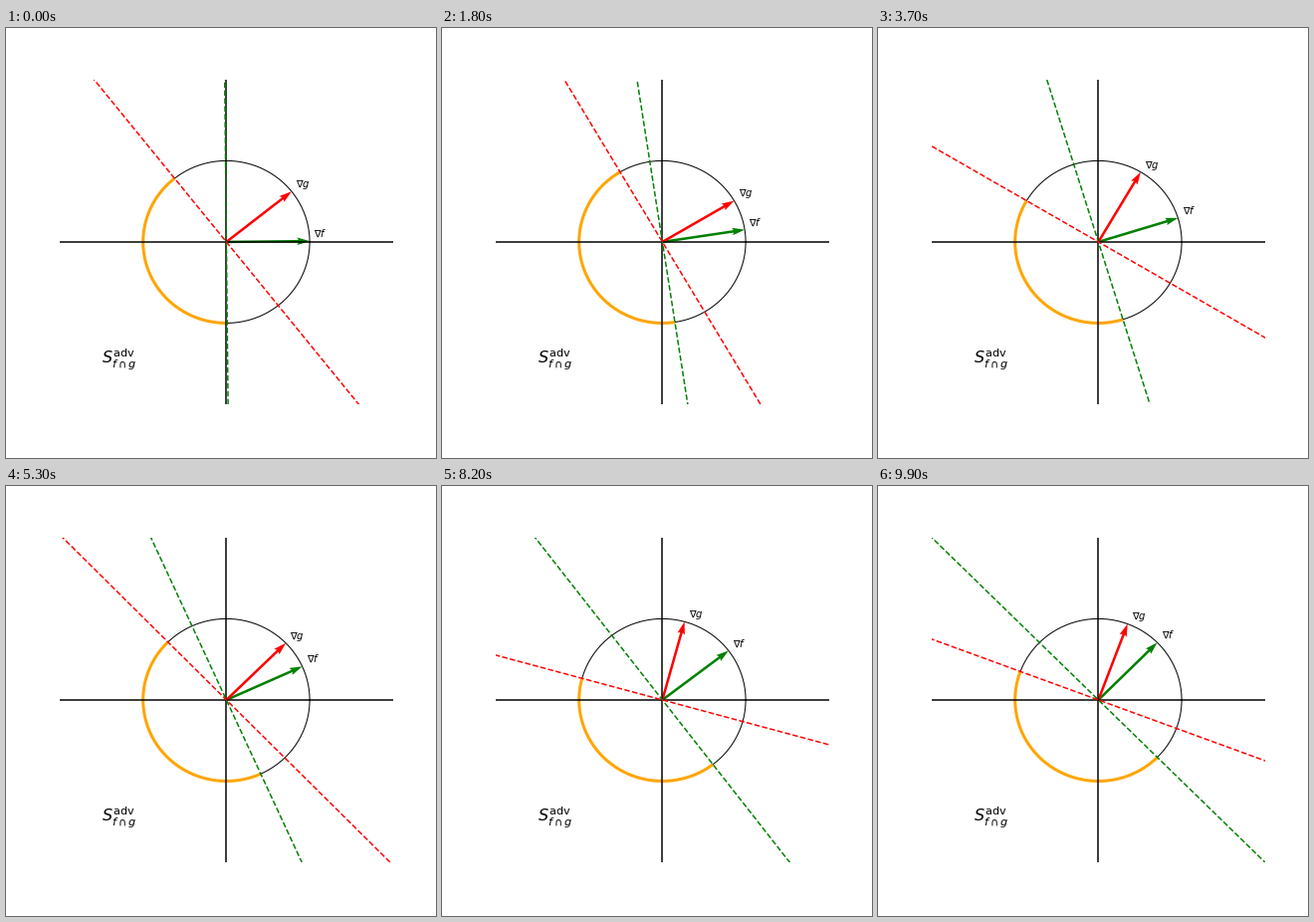
These frames come from a looping animation (432 px wide and 432 px high, 10000 ms). A matplotlib script:

```python
import numpy as np
import matplotlib.pyplot as plt
from matplotlib.animation import FuncAnimation

FRAMES = 100
fig, ax = plt.subplots(figsize=(6, 6), dpi=72)
fig.subplots_adjust(left=0.125, right=0.9, bottom=0.125, top=0.88)
ax.set(xlim=(-2, 2), ylim=(-2, 2))
ax.axis("off")

# f turns steadily; g leads it by a swinging angle.
steps = np.arange(FRAMES)
f_angle = np.linspace(0.01, np.pi / 4, FRAMES)
phase = np.interp(steps, [0, 18, 37, 53, 66, 82, 99],
                  [2.553, 5.279, 8.198, 10.873, 12.396, 15.188, 18.188])
g_angle = f_angle + 0.55 + 0.2 * np.sin(phase)


def arc(start, end):
    a = np.linspace(start, end, 200)
    return np.cos(a), np.sin(a)


class Gradient:
    """Arrow, label and dashed boundary line of one constraint."""

    def __init__(self, name, color):
        self.arrow = ax.quiver(0, 0, 1, 0, color=color, angles="xy",
                               scale_units="xy", scale=1)
        self.line, = ax.plot([], [], "--", color=color, lw=1.5)
        self.label = ax.text(0, 0, rf"$\nabla {name}$", fontsize=10)

    def turn(self, angle):
        x, y = np.cos(angle), np.sin(angle)
        self.arrow.set_UVC(x, y)
        ends = np.array([-10, 10])
        self.line.set_data(ends, -ends * x / y)
        self.label.set_position((x + 0.05, y + 0.05))


ax.plot(*arc(0, 2 * np.pi), color="black", lw=1, zorder=1)
region, = ax.plot([], [], color="orange", lw=3, zorder=1,
                  solid_capstyle="butt")
ax.axhline(0, color="black", lw=1.5)
ax.axvline(0, color="black", lw=1.5)
grad_f = Gradient("f", "green")
grad_g = Gradient("g", "red")
ax.text(-1.5, -1.5, r"$S^{\mathrm{adv}}_{f \cap g}$", fontsize=16)


def update(i):
    f, g = f_angle[i], g_angle[i]
    grad_f.turn(f)
    grad_g.turn(g)
    region.set_data(*arc(g + np.pi / 2, f + 3 * np.pi / 2))
    return []


anim = FuncAnimation(fig, update, frames=FRAMES, interval=100,
                     repeat=True, repeat_delay=0)
plt.show()
```
